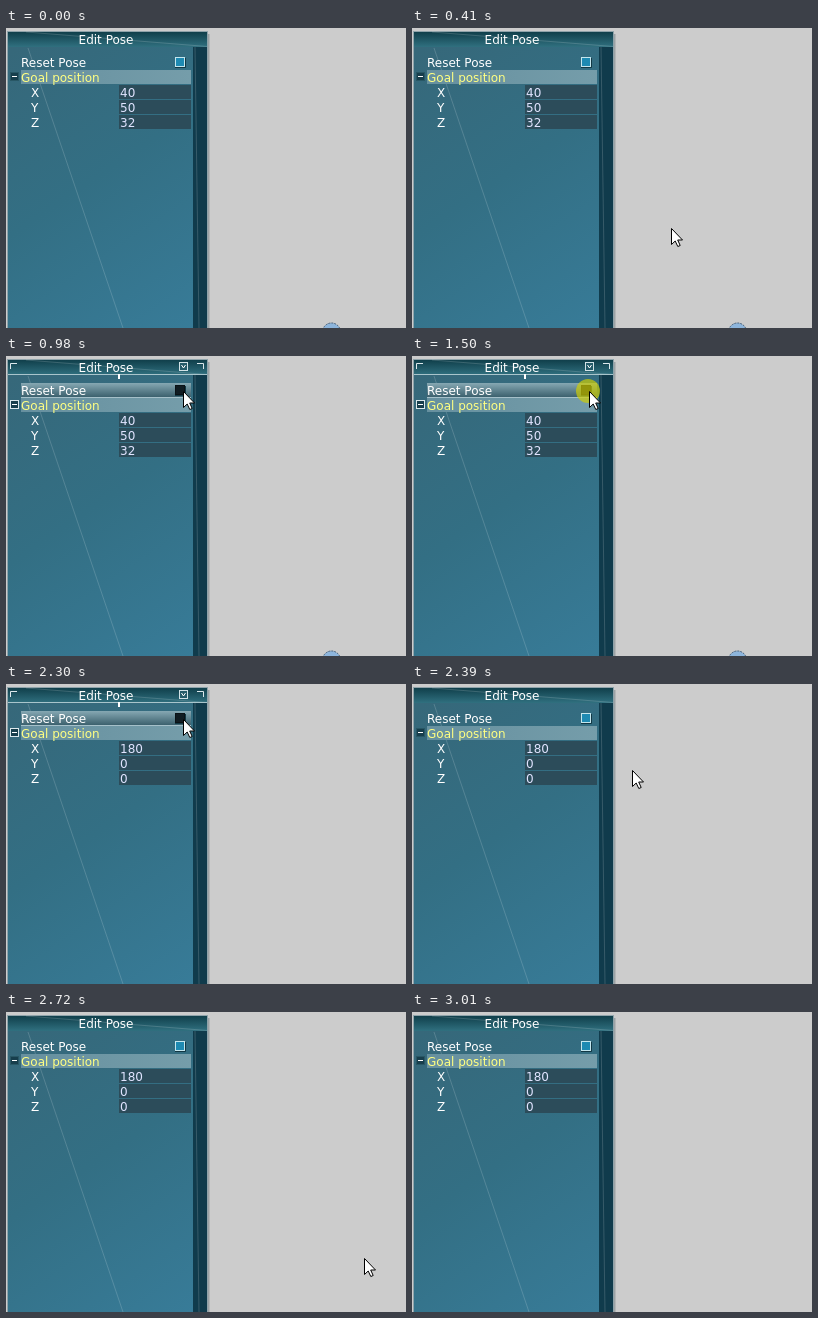
Write an HTML page that moves like this. It is 400 by 300 pixels and loops after 3510 ms.

```html
<!DOCTYPE html>
<html lang="en">
<head>
<meta charset="utf-8">
<title>Edit Pose</title>
<style>
  html, body { margin: 0; width: 100%; height: 100%; overflow: hidden; background: #ccc; }
  svg { display: block; width: 100%; height: 100%; }
  text { font: 12px "DejaVu Sans", sans-serif; fill: #fff; white-space: pre; }
  .value { fill: #e0e4ff; }
  .field { fill: #2c4c5a; }
  .hairline { stroke: #fff; stroke-opacity: .16; fill: none; }
  .chrome, .hover { visibility: hidden; }
  .active .chrome, .on-reset .hover.reset, .on-goal .hover.goal { visibility: visible; }
  .toggle { fill: #173e4c; stroke: #285765; }
  .active .toggle { stroke: #dce8ec; }
  .on-goal .toggle { fill: #000; }
  .box { fill: #1e8ab2; stroke: #c4e6ee; }
  .on-reset .box { fill: #101c22; stroke: #0a1216; }
</style>
</head>
<body>
<svg viewBox="0 0 400 300" preserveAspectRatio="none">
  <defs>
    <linearGradient id="body" gradientUnits="userSpaceOnUse" x1="10" y1="20" x2="200" y2="300">
      <stop stop-color="#36687a"/>
      <stop offset=".45" stop-color="#336f84"/>
      <stop offset="1" stop-color="#387c99"/>
    </linearGradient>
    <linearGradient id="title" x2="0" y2="1">
      <stop stop-color="#103f4b"/>
      <stop offset="1" stop-color="#30707f"/>
    </linearGradient>
    <linearGradient id="bar">
      <stop stop-color="#66909f"/>
      <stop offset="1" stop-color="#759daa"/>
    </linearGradient>
    <linearGradient id="lit" x2="0" y2="1">
      <stop stop-color="#86a8b3"/>
      <stop offset="1" stop-color="#3c616e"/>
    </linearGradient>
  </defs>

  <rect width="400" height="300" fill="#ccc"/>
  <g id="ball">
    <circle cx="325.5" cy="304" r="9" fill="#8db5dc"/>
    <circle cx="325.5" cy="304" r="9" fill="none" stroke="#3f5b78" stroke-dasharray="2 1"/>
  </g>

  <g id="panel">
    <path d="M202.5 6V300" stroke="#8d9598" stroke-width="2" opacity=".75"/>
    <rect x="1" y="3" width="201" height="297" fill="#8fa3aa"/>
    <rect x="2" y="4" width="199" height="296" fill="url(#body)"/>
    <rect x="2" y="4" width="199" height="15" fill="url(#title)"/>
    <rect x="187" y="19" width="14" height="281" fill="#103b4c"/>
    <path class="hairline" d="M22 20L117 300M20 4L201 18.5M189 19L193 300"/>
    <text x="100" y="16" text-anchor="middle">Edit Pose</text>

    <g class="chrome" fill="none" stroke="#fff">
      <path d="M2 18.5H201" stroke="#a9c5cc"/>
      <path d="M4.500 13V7.500H11M191 7.500H197.500V13" stroke="#dce8ec"/>
      <rect x="173.500" y="6.500" width="8" height="8" fill="#245b69" stroke="#d2e2e6"/>
      <path d="M175.500 9L177.500 12L179.500 9"/>
      <path d="M113 18V23" stroke-width="2"/>
    </g>

    <g class="hover reset">
      <rect x="15" y="27" width="170" height="14" fill="url(#lit)"/>
      <path d="M15 41.500H185" stroke="#a5c0c9"/>
    </g>
    <text x="15" y="39">Reset Pose</text>
    <path d="M169 39.500H179.500V30" fill="none" stroke="#123844"/>
    <rect class="box" x="169.500" y="29.500" width="9" height="9"/>

    <rect x="15" y="42" width="170" height="14" fill="url(#bar)"/>
    <rect class="hover goal" x="15" y="42" width="170" height="14" fill="url(#lit)"/>
    <rect class="toggle" x="4.500" y="44.500" width="8" height="8"/>
    <path d="M6 48.500H11" stroke="#fff"/>
    <text x="15" y="54" style="fill:#ffff82">Goal position</text>
    <g id="fields"></g>
  </g>

  <circle id="halo" cx="176" cy="35" r="12" fill="#d2cf00" fill-opacity=".68"/>
  <path id="cursor" d="M.5 .5V16.500L4.200 13L6.800 18.500L9.200 17.500L6.700 12H11.500Z" fill="#fff" stroke="#000"/>
</svg>
<script>
  const LOOP = 3510, STEPS = 15;
  const TARGET = [177, 35];
  const $ = id => document.getElementById(id);
  const panel = $("panel"), cursor = $("cursor");

  $("fields").innerHTML = ["X", "Y", "Z"].map((axis, i) => {
    const y = 57 + 15 * i;
    return `<rect class="field" x="113" y="${y}" width="72" height="14"/>
      <text x="25" y="${y + 12}">${axis}</text>
      <text class="value" x="114" y="${y + 12}"></text>`;
  }).join("");
  const values = document.querySelectorAll(".value");

  const show = (node, on) => node.setAttribute("visibility", on ? "visible" : "hidden");
  const stepAt = (t, start, length) => Math.min(STEPS, Math.floor((t - start) / length + .1));

  // Remaining share of the way in: exponential approach that lands on zero.
  const approach = n => (Math.exp(-n / 5) - Math.exp(-3)) / (1 - Math.exp(-3));

  // Share of the way out already covered.
  const leave = n => {
    const u = n / STEPS;
    return .89 * Math.sin(u * Math.PI / 2) + .11 * (1 - Math.cos(u * Math.PI)) / 2;
  };

  function pointer(t) {
    if (t < 280) return null;
    let dx = 0, dy = 0;
    if (t < 980) {
      const k = approach(stepAt(t, 280, 46.6));
      dx = 126 * k;
      dy = 253 * k;
    } else if (t >= 2300) {
      const n = stepAt(t, 2300, 47);
      if (n >= STEPS) return null;
      dx = 228 * leave(n);
      dy = 267 * leave(n);
    }
    return [Math.round(TARGET[0] + dx), Math.round(TARGET[1] + dy)];
  }

  function draw(t) {
    const at = pointer(t);
    const [x, y] = at || [400, 300];
    const inRow = top => x <= 186 && y >= top && y < top + 15;
    show(cursor, at);
    cursor.setAttribute("transform", `translate(${x} ${y})`);
    panel.classList.toggle("active", x <= 201);
    panel.classList.toggle("on-reset", inRow(27));
    panel.classList.toggle("on-goal", inRow(42));

    const done = t >= 1730;
    show($("halo"), t >= 1500 && !done);
    show($("ball"), !done);
    (done ? [180, 0, 0] : [40, 50, 32]).forEach((v, i) => values[i].textContent = v);
  }

  const begin = performance.now();
  function tick() {
    draw((performance.now() - begin) % LOOP);
    requestAnimationFrame(tick);
  }
  tick();
</script>
</body>
</html>
```
